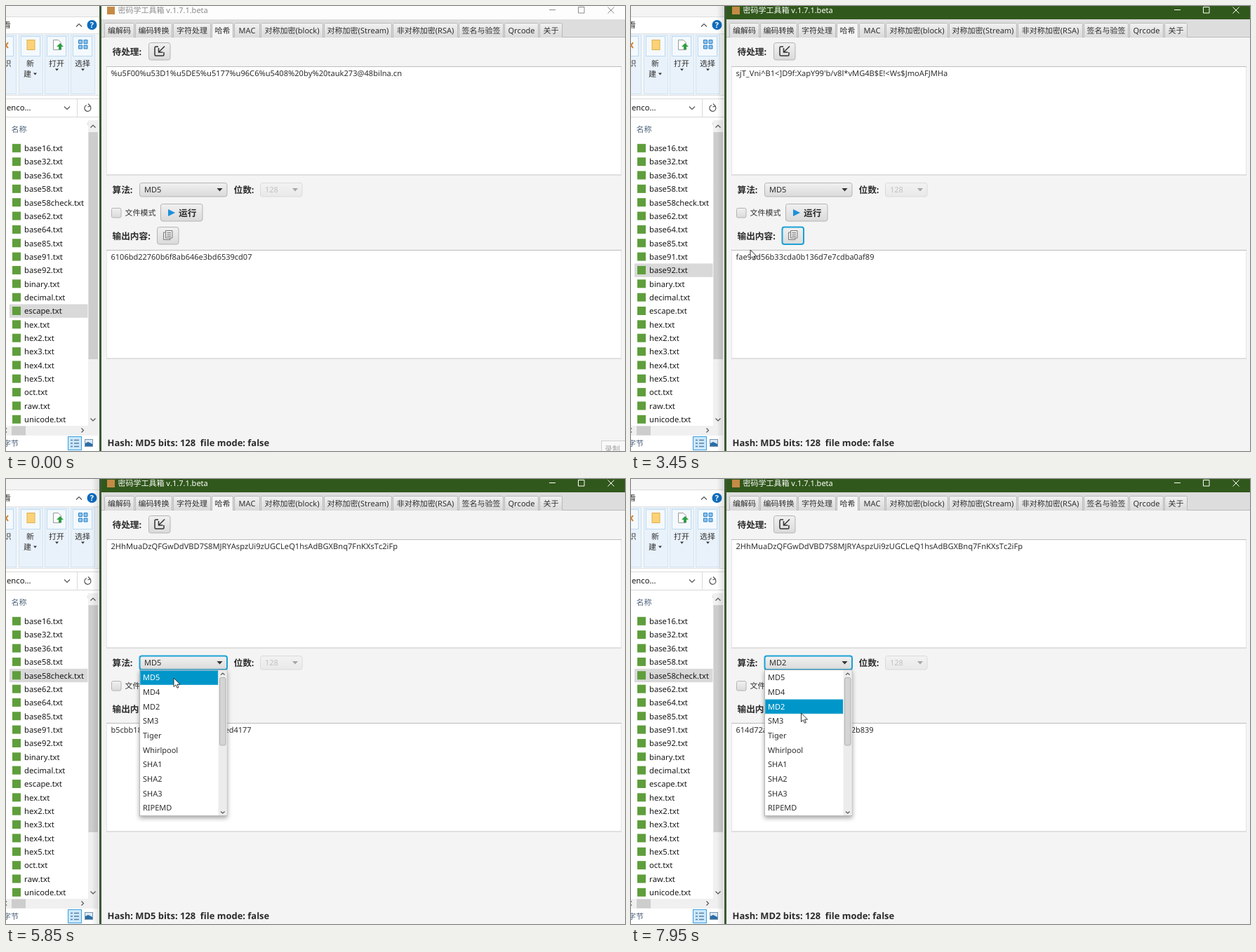
An HTML page for the animation above (8 s loop, 882 by 635 pixels).

```html
<!DOCTYPE html>
<html lang="zh">
<head>
<meta charset="utf-8">
<title>密码学工具箱</title>
<style>
html, body { margin: 0; width: 100%; height: 100%; overflow: hidden; background: #f4f4f4; }
svg { display: block; }
text { font: 11px "Noto Sans", "Open Sans", "Noto Sans CJK SC", "Noto Sans CJK", sans-serif; font-kerning: none; font-variant-ligatures: none; fill: #2e2e2e; white-space: pre; text-rendering: geometricPrecision; }
.file { font-size: 11.25px; fill: #1a1a1a; }
.soft { fill: #4c607a; }
.label { font-size: 12.7px; font-weight: 700; fill: #2b2b2b; }
.status { font-family: "Open Sans", sans-serif; font-size: 12.95px; font-weight: 700; fill: #2b2b2b; }
#input { font-size: 11.12px; }
.line { fill: none; stroke: #555; stroke-width: 1.2; }
.box { fill: url(#btn); stroke: #b4b4b4; }
.focus { stroke: #1ba1d6; stroke-width: 2; }
.area { fill: #fff; stroke: #e6e6e6; }
</style>
</head>
<body>
<svg id="stage" width="882" height="635" viewBox="0 0 882 635">
  <defs>
    <linearGradient id="btn" x2="0" y2="1"><stop stop-color="#f1f1f1"/><stop offset="1" stop-color="#dadada"/></linearGradient>
    <linearGradient id="glass" x2="0" y2="1"><stop stop-color="#e6f2f8"/><stop offset="1" stop-color="#b8d3e0"/></linearGradient>
    <linearGradient id="edge"><stop stop-opacity="0"/><stop offset="1" stop-opacity=".12"/></linearGradient>
    <filter id="drop" x="-20%" y="-20%" width="140%" height="140%"><feDropShadow dx="0" dy="3" stdDeviation="3" flood-opacity=".35"/></filter>
  </defs>

  <g id="explorer">
    <rect width="133" height="635" fill="#fff"/>
    <rect width="133" height="15" fill="#f4f4f4"/>
    <path d="M0 15.5H133" stroke="#dcdcdc"/>
    <text x="-4" y="31">看</text>
    <path class="line" d="M100 29.5l4-4 4 4" stroke="#8a8a8a"/>
    <circle cx="122.5" cy="27" r="7" fill="#0f6cbd"/>
    <text x="119.8" y="31" style="fill:#fff;font-weight:700">?</text>
    <rect y="39" width="133" height="88" fill="#f5f6f7"/>
    <path d="M0 39.5H133M0 127.5H133" stroke="#dfe1e3"/>
    <g id="ribbon" fill="#e9f2fa" stroke="#cfe3f4"></g>
    <path d="M-3 52l6 8m0-8l-6 8" stroke="#d9822b" stroke-width="2"/>
    <rect x="30" y="48.500" width="11" height="14" fill="#fbd277" stroke="#e3b04b"/>
    <path d="M67.500 48.500h7l4 4v10h-11z" fill="#fff" stroke="#9a9a9a"/>
    <path d="M75 62v-4h-3l5-5 5 5h-3v4z" fill="#2e9e44"/>
    <path d="M103.500 48.500h5v5h-5zM111 48.500h5v5h-5zM103.500 56h5v5h-5zM111 56h5v5h-5z" fill="#8cc4ef" stroke="#2f83c5"/>
    <text x="-3.500" y="86">识</text>
    <text x="29" y="86">新</text><text x="25" y="101">建</text>
    <text x="61" y="86">打开</text><text x="98" y="86">选择</text>
    <path d="M39 95.500h5l-2.500 3zM70 89.500h5l-2.500 3zM107 89.500h5l-2.500 3z" fill="#333"/>
    <path d="M0 132.500H133M0 158.500H133M101.500 133V158" stroke="#d9d9d9"/>
    <text class="file" x="1" y="149">enco...</text>
    <path class="line" d="M83 143.500l4 4 4-4"/>
    <path class="line" d="M119.500 142.500a4.500 4.500 0 1 1-4.500-1M117 139.500l3 3-3.500 1.500"/>
    <text class="soft" x="7.500" y="180">名称</text>
    <path d="M116.500 166v4" stroke="#ddd"/>
    <rect id="hover" x="5" width="111.500" height="19.350" fill="#e5f3ff"/>
    <rect id="chosen" x="5" width="111.500" height="19.350" fill="#d9d9d9"/>
    <g id="files"></g>
    <rect x="117" y="163" width="14" height="437" fill="#f0f0f0"/>
    <rect x="117.500" y="180" width="13.500" height="324" fill="#cdcdcd"/>
    <path class="line" d="M120.500 173.500l3.500-3.500 3.500 3.500M120.500 588.500l3.500 3.500 3.500-3.500"/>
    <rect y="599" width="131" height="14" fill="#f0f0f0"/>
    <rect x="8" y="599.500" width="20" height="13" fill="#cdcdcd"/>
    <path class="line" d="M1 602.500l-3 3 3 3M107.500 602.500l3 3-3 3"/>
    <text class="soft" x="-4" y="628">字节</text>
    <rect x="88.500" y="614.500" width="19" height="19" fill="#cce8ff" stroke="#3c9fdd"/>
    <path d="M92 619.500h3m2 0h7M92 624h3m2 0h7M92 628.500h3m2 0h7" stroke="#5b7fa0" stroke-width="1.600"/>
    <rect x="112.500" y="618.500" width="11" height="10" fill="#dceaf5" stroke="#7a94ab"/>
    <path d="M113 628v-4l4-2 6 3v3z" fill="#2a6da8"/>
  </g>

  <rect id="shade" x="122" width="11" height="635" fill="url(#edge)"/>
  <rect x="133" width="3" height="635" fill="#3d5a36"/>
  <rect x="136" width="746" height="635" fill="#f4f4f4"/>
  <rect id="bar" x="136" width="746" height="19"/>
  <rect x="144" y="1" width="11" height="11" fill="#c58a45"/>
  <text id="title" x="159.500" y="10">密码学工具箱 v.1.7.1.beta</text>
  <path id="winbtn" fill="none" d="M774 5.500h9M815.500 1.500h8.500v8.500h-8.500zM857.500 1.500l9 9m0-9l-9 9"/>
  <rect x="136" y="19" width="746" height="26" fill="#dddddd"/>
  <path d="M136 44.500H882" stroke="#bcbcbc"/>
  <g id="tabs"></g>

  <text class="label" x="151.500" y="70">待处理:</text>
  <rect class="box" x="203.500" y="52.500" width="30.500" height="24.500" rx="3"/>
  <path d="M217 58h-3.500q-1.500 0-1.500 1.500v10q0 1.500 1.500 1.500h10q1.500 0 1.500-1.500v-3.500M226 57.500l-8.500 8.500m0-6v6h6" fill="none" stroke="#333" stroke-width="1.500"/>
  <rect class="area" x="143.500" y="86.500" width="733" height="154.500"/>
  <path d="M143 86.500H877M143 348.500H877" stroke="#bdbdbd"/>
  <text id="input" x="149.500" y="100"></text>

  <text class="label" x="151.500" y="266.500">算法:</text>
  <rect id="combo" class="box" x="190.500" y="252.500" width="124.500" height="19.500" rx="3"/>
  <text id="algo" x="197" y="266"></text>
  <path d="M300.500 260h8l-4 4.500z" fill="#333"/>
  <text class="label" x="324.500" y="266.500">位数:</text>
  <g opacity=".4">
    <rect class="box" x="362.500" y="252.500" width="59.500" height="19.500" rx="3"/>
    <text x="369" y="266" style="fill:#777">128</text>
    <path d="M408 260h8l-4 4.500z" fill="#333"/>
  </g>
  <rect class="box" x="150.500" y="288.500" width="13.500" height="13.500" rx="2"/>
  <text x="169.500" y="299">文件模式</text>
  <rect class="box" x="220.500" y="282.500" width="59.500" height="24.500" rx="3"/>
  <path d="M231 290v10l10-5z" fill="#1e8fdb"/>
  <text class="label" x="246" y="299.500">运行</text>
  <text class="label" x="151.500" y="332.500">输出内容:</text>
  <rect id="copy" class="box" x="215.500" y="315.500" width="30.500" height="24.500" rx="3"/>
  <path d="M227.500 323h-3v10.500h9.500v-2.500M227.500 320.500h9.500v10.500h-9.500zM229.500 323.500h5.500m-5.500 2.500h5.500m-5.500 2.500h5.500" fill="none" stroke="#7d7d7d"/>
  <rect class="area" x="143.500" y="348.500" width="733" height="154.500"/>
  <path d="M143 348.500H877" stroke="#bdbdbd"/>
  <path d="M143 241H877M143 503H877" stroke="#d0d0d0"/>
  <text id="hash" x="149.500" y="362"></text>
  <text id="status" class="status" x="144.500" y="627.500"></text>

  <g id="popup">
    <rect x="190.500" y="272.500" width="124.500" height="208" fill="#fff" stroke="#b8b8b8" filter="url(#drop)"/>
    <g id="items"></g>
    <rect x="302.500" y="273" width="12" height="207" fill="#ececec"/>
    <rect x="304.500" y="283.500" width="8.500" height="96.500" rx="2" fill="#d4d4d4" stroke="#b2b2b2"/>
    <path class="line" d="M306 279.500l2.800-2.500 2.800 2.500M306 474.500l2.800 2.500 2.800-2.500" stroke="#888"/>
  </g>

  <g id="record">
    <rect x="848.500" y="620.500" width="40" height="20" fill="#f8f8f8" stroke="#cfcfcf"/>
    <text x="853" y="635.500" style="fill:#a5a5a5">录制</text>
  </g>
  <g id="ghost">
    <rect x="-79.500" y="-53.500" width="92" height="92" rx="2" fill="url(#glass)" fill-opacity=".65" stroke="#9db0ba" stroke-opacity=".8"/>
    <path d="M11.500-52V37.500" stroke="#fff" stroke-opacity=".6"/>
  </g>
  <path id="ban" d="M-21 49a5 5 0 1 0 10 0a5 5 0 1 0-10 0M-19.500 45.500l7 7" fill="none" stroke="#a8431f" stroke-width="1.500"/>
  <circle id="ring" r="11" fill="#fbe92a" fill-opacity=".65"/>
  <path id="cursor" d="M0 0V12.500L2.900 9.800 5 14.300 6.900 13.400 4.900 9.100H9Z" fill="#fff" stroke="#222" stroke-width=".9"/>
</svg>
<script>
const $ = id => document.getElementById(id);
const LOOP = 8000, ROW = 19.35, TOP = 193.3, ITEM = 20.67, POP = 273;

const files = ("base16 base32 base36 base58 base58check base62 base64 base85 base91 base92 binary " +
  "decimal escape hex hex2 hex3 hex4 hex5 oct raw unicode").split(" ");
const algos = "MD5 MD4 MD2 SM3 Tiger Whirlpool SHA1 SHA2 SHA3 RIPEMD".split(" ");
const tabs = [["编解码", 140, 182], ["编码转换", 184, 236], ["字符处理", 238, 291], ["哈希", 293, 323],
  ["MAC", 325, 361], ["对称加密(block)", 363, 451], ["对称加密(Stream)", 453, 549],
  ["非对称加密(RSA)", 551, 643], ["签名与验签", 645, 708], ["Qrcode", 710, 758], ["关于", 760, 792]];

$("ribbon").innerHTML = [-20, 18, 55, 92].map(x =>
  `<rect x="${x + .5}" y="41.5" width="34" height="84"/><rect x="${x + 3.5}" y="43.5" width="27" height="28" fill="#f4f9fd" stroke="#bcd9f0"/>`).join("");
$("files").innerHTML = files.map((name, i) => {
  const y = TOP + i * ROW;
  return `<rect x="9" y="${y + 3.5}" width="12" height="12" fill="#5f9e3c"/><text class="file" x="26" y="${y + 13.8}">${name}.txt</text>`;
}).join("");
$("tabs").innerHTML = tabs.map(([name, a, b], i) => {
  const on = i === 3;
  return `<path d="M${a + .5} 45V26.5q0-2 2-2H${b - 1.5}q2 0 2 2V45" fill="${on ? "#f4f4f4" : "url(#btn)"}" stroke="#b9b9b9"/>` +
    `<text x="${(a + b + 1) / 2}" y="39" text-anchor="middle">${name}</text>`;
}).join("");
$("items").innerHTML = algos.map((name, i) =>
  `<rect x="191.5" y="${POP + .5 + i * ITEM}" width="110.5" height="${ITEM - .7}" fill="#0096c9" stroke="#2ba8d3" stroke-width=".8"/>` +
  `<text x="195" y="${POP + 14.2 + i * ITEM}">${name}</text>`).join("");
const items = [...$("items").querySelectorAll("rect")].map(r => [r, r.nextSibling]);

// time, pointer x, pointer y, changes; ring, drag, ban, fade and record last one step only
const steps = [
  [0, -40, -40, { record: 1, sel: "escape", algo: "MD5", focus: "", active: 0, open: 0,
    input: "%u5F00%u53D1%u5DE5%u5177%u96C6%u5408%20by%20tauk273@48bilna.cn",
    hash: "6106bd22760b6f8ab646e3bd6539cd07" }],
  [260, 520, 520],
  [520, 70, 352],
  [790, 50, 332, { ring: 1, sel: "base85" }],
  [1060, 150, 285, { ring: 1, drag: 1, ban: 1 }],
  [1320, 273.5, 244.5, { input: "jh--*O-/P5V<*E?l'mFhOGG#gGp$p7Df.Bc2F',TE,TK*AM.J1" }],
  [1600, 253, 293, { ring: 1, active: 1 }],
  [1860, 253, 290, { focus: "copy", hash: "fae93d56b33cda0b136d7e7cdba0af89" }],
  [2130, 130, 335],
  [2390, 50, 373, { ring: 1, sel: "base92" }],
  [2660, 198.5, 272, { ring: 1, drag: 1, ban: 1 }],
  [2920, 331, 138, { drag: 1, fade: 1, input: "sjT_Vni^B1<]D9f:XapY99'b/v8l*vMG4B$E!<Ws$JmoAFJMHa" }],
  [3190, 252, 290],
  [3450, 170, 348],
  [3720, 112, 410],
  [3980, 60, 436],
  [4240, 44.5, 279],
  [4520, 235, 128, { ring: 1, drag: 1, sel: "base58check" }],
  [4780, 225, 180, { input: "2HhMuaDzQFGwDdVBD7S8MJRYAspzUi9zUGCLeQ1hsAdBGXBnq7FnKXsTc2iFp" }],
  [5050, 248, 260],
  [5310, 253, 297, { ring: 1, hash: "b5cbb180927c4518360c729543ed4177" }],
  [5580, 245, 256, { ring: 1 }],
  [5850, 239, 284, { open: 1, focus: "combo" }],
  [6110, 240, 302],
  [6380, 240, 303, { open: 0, algo: "MD4", hash: "f0d1f6d2a7409c51837062946158c596" }],
  [6640, 244, 264, { open: 1, ring: 1 }],
  [6910, 236, 300],
  [7170, 232.5, 328],
  [7430, 236, 325, { open: 0, algo: "MD2", hash: "614d72a59f08c3614f7209563812b839" }],
  [7690, 245, 264, { open: 1, ring: 1 }],
  [7950, 242.5, 334]
];
let last = {};
const states = steps.map(([t, x, y, change]) =>
  last = { ...last, ring: 0, drag: 0, ban: 0, fade: 0, record: 0, ...change, t, x, y });

const show = (id, on) => $(id).style.display = on ? "" : "none";

function draw(s) {
  const at = `translate(${s.x} ${s.y})`;
  for (const id of ["cursor", "ring", "ghost", "ban"]) $(id).setAttribute("transform", at);
  show("ring", s.ring);
  show("ghost", s.drag);
  show("ban", s.ban);
  show("record", s.record);
  show("popup", s.open);
  show("shade", s.active);
  $("ghost").style.opacity = s.fade ? .5 : 1;

  const over = s.x > 5 && s.x < 117 ? Math.floor((s.y - TOP) / ROW) : -1;
  show("hover", over >= 0 && over < files.length);
  $("hover").setAttribute("y", TOP + over * ROW);
  $("chosen").setAttribute("y", TOP + files.indexOf(s.sel) * ROW);

  $("bar").style.fill = s.active ? "#31581c" : "#fdfdfd";
  $("title").style.fill = s.active ? "#fff" : "#8c8c8c";
  $("winbtn").style.stroke = s.active ? "#fff" : "#8c8c8c";
  for (const id of ["copy", "combo"]) $(id).classList.toggle("focus", s.focus === id);

  $("input").textContent = s.input;
  $("hash").textContent = s.hash;
  $("algo").textContent = s.algo;
  $("status").textContent = `Hash: ${s.algo} bits: 128  file mode: false`;

  const hot = Math.floor((s.y - POP) / ITEM);
  items.forEach(([rect, label], i) => {
    const on = i === hot || algos[i] === s.algo;
    rect.style.display = on ? "" : "none";
    label.style.fill = on ? "#fff" : "#2e2e2e";
  });
}

const start = performance.now();
let current;
function tick() {
  const t = Math.max(0, performance.now() - start) % LOOP;
  const s = states.findLast(k => k.t <= t);
  if (s !== current) draw(current = s);
  requestAnimationFrame(tick);
}
tick();
</script>
</body>
</html>
```
